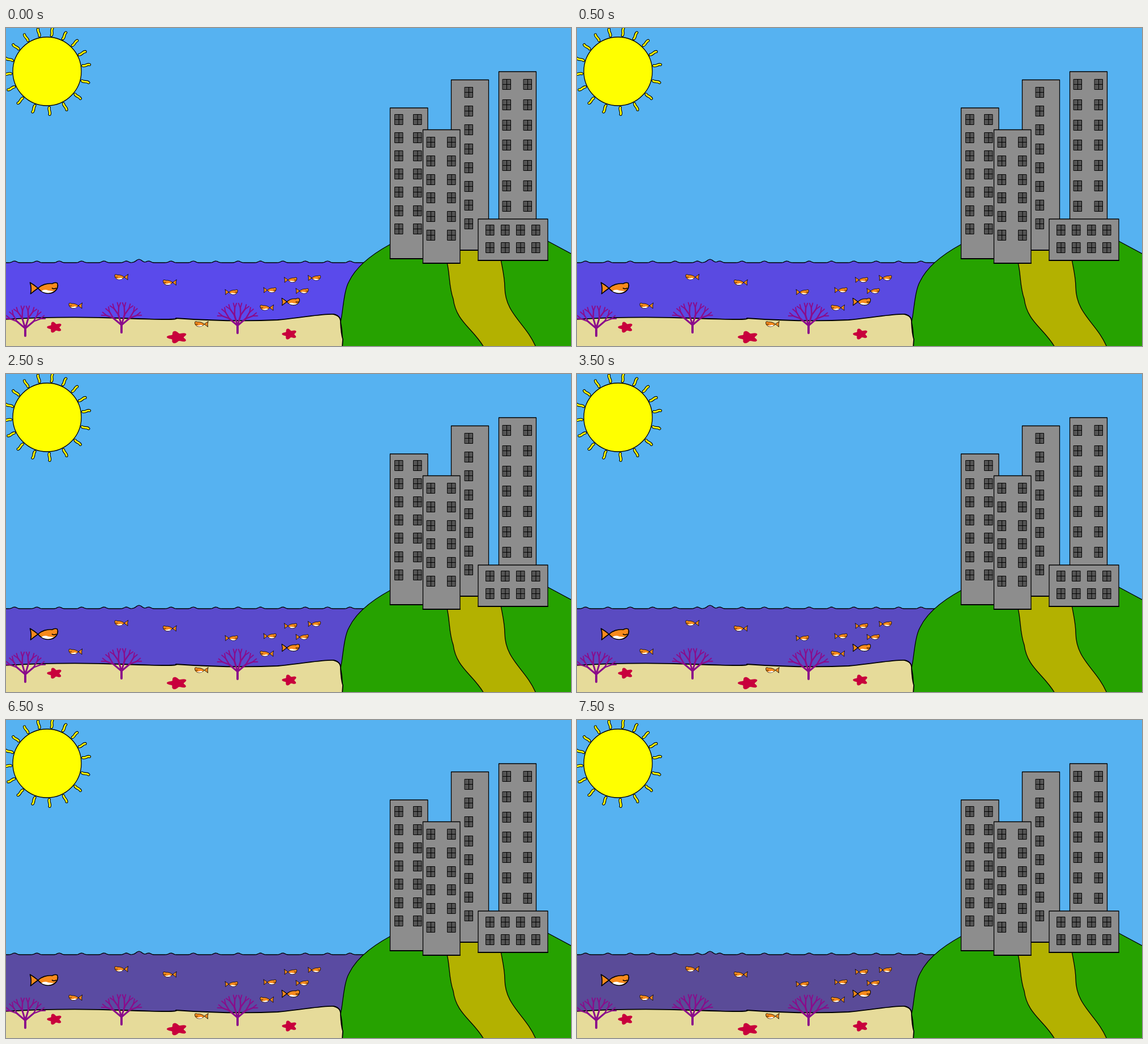
An HTML page that plays this animation: 998 px wide and 561 px high, repeating every 8000 ms.

```html
<!DOCTYPE html>
<html lang="en">
<head>
<meta charset="utf-8">
<title>Sea and city</title>
<style>
  html, body { margin: 0; width: 100%; height: 100%; overflow: hidden; background: #56b2f1; }
  svg { display: block; stroke-linecap: round; stroke-linejoin: round; }
  .rays, #coral { fill: none; }
  #fish path { vector-effect: non-scaling-stroke; }
</style>
</head>
<body>
<svg width="998" height="561" viewBox="0 0 998 561" stroke="#000" stroke-width="1.3">
  <defs>
    <path id="rays"/>
    <g id="coral" stroke="#8b0b8b"></g>
    <path id="star" fill="#c8003c" stroke="none"/>
    <g id="fish">
      <path fill="#f88a1c" d="M-24-10Q-17-6-10 0-17 5-23 10-21 0-24-10Z"/>
      <path fill="#f88a1c" d="M-10 0C-4-6 6-9 15-8Q20-11 24-9C26-5 25 2 19 6 10 12-3 9-10 0Z"/>
      <path fill="#fff" stroke="none" d="M-4 5Q2 1 8 4 14 5 18 5C12 10 2 9-4 5Z"/>
      <path fill="none" d="M15 0Q18 2 22 0"/>
    </g>
    <path id="window" fill="#555" stroke-width="1" d="M-7-9H7V9H-7ZM0-9V9M-7 0H7"/>
  </defs>

  <circle cx="72.5" cy="76.5" r="60.5" fill="#ff0"/>
  <use href="#rays" class="rays" stroke-width="5.2"/>
  <use href="#rays" class="rays" stroke="#ff0" stroke-width="3"/>

  <path id="sea"/>
  <path fill="#26a200" d="M593 563Q596 540 591 518C595 505 596 464 606 447 618 422 645 400 678 382L957 376 1000 399V563Z"/>
  <path fill="#e6db9a" stroke-width="1.8" d="M-2 514Q100 508 205 512T300 512Q400 519 480 515C530 510 560 504 579 505Q592 508 591 520 592 540 595 549L594 563H-2Z"/>
  <path fill="#b3b100" d="M779 414C784 432 782 456 790 478 795 518 825 530 844 563H936C918 520 882 505 881 458 881 440 877 425 874 408L830 385H795Z"/>
  <g id="buildings"></g>
  <g id="seabed"></g>
  <g id="school"></g>
</svg>
<script>
const byId = id => document.getElementById(id);
const range = (n, make) => Array.from({ length: n }, (_, i) => make(i));
const place = (id, x, y, sx = 1, sy = sx, attrs = '') =>
  `<use href="#${id}" transform="translate(${x} ${y}) scale(${sx} ${sy})" ${attrs}/>`;
const polar = (angle, r) => [r * Math.cos(angle), r * Math.sin(angle)];

// Seventeen wavy rays, a little crowded on the left side.
byId('rays').setAttribute('d', range(17, i => {
  const angle = (i * 360 / 17 - 9 + 16 * Math.sin(Math.PI * i / 17)) * Math.PI / 180;
  const points = range(4, k => {
    const [x, y] = polar(angle + [0, .03, -.03, 0][k], 64 + 4 * k);
    return `${72.5 + x} ${76.5 + y}`;
  });
  return `M${points[0]}C${points.slice(1)}`;
}).join(''));

// Small regular crests and one large wave.
const surface = x => 414
  - 3 * Math.max(0, Math.cos((x - 15) * 2 * Math.PI / 39.5)) ** 3
  - 6 * Math.exp(-(((x - 235) / 7) ** 2));
byId('sea').setAttribute('d', `M-2 561L${range(215, i => `${3 * i - 2} ${surface(3 * i - 2)}`)}V561Z`);

function branch(x, y, angle, length, width) {
  const [dx, dy] = polar(angle, length);
  const line = `<path d="M${x} ${y}l${dx} ${dy}" stroke-width="${width}"/>`;
  if (length < 9) return line;
  return line + [-.33, .33].map(turn =>
    branch(x + dx, y + dy, angle + turn, length * .68, width * .8)).join('');
}
byId('coral').innerHTML = '<path d="M0-1V-16" stroke-width="4"/>' +
  range(4, i => branch(0, -14, -Math.PI / 2 + (i - 1.5) * .58, 19, 3)).join('');

byId('star').setAttribute('d', `M${range(40, i => {
  const angle = i * Math.PI / 20;
  return polar(angle, 1 + .25 * Math.cos(5 * angle + 3));
})}Z`);

byId('seabed').innerHTML =
  place('coral', 34, 544) + place('coral', 204, 538) + place('coral', 409, 539) +
  place('star', 86, 528, 11, 8) + place('star', 302.5, 545.5, 15, 9) + place('star', 501, 540, 11, 8);

// Window columns and rows are given as first, step, count.
function building(left, top, right, bottom, [x, dx, columns], [y, dy, rows]) {
  return `<path fill="#8d8d8d" d="M${left} ${top}H${right}V${bottom}H${left}Z"/>` +
    `<path d="M${left} ${bottom}H${right}" stroke-width="2"/>` +
    range(columns, i => range(rows, j =>
      place('window', x + i * dx, Math.round(y + j * dy) + .5)).join('')).join('');
}
byId('buildings').innerHTML =
  building(678.5, 141, 745, 407, [694, 33, 2], [161, 32.1, 7]) +
  building(786.5, 91.5, 852.5, 392, [817.5, 0, 1], [113, 33.2, 8]) +
  building(736.5, 179.5, 802, 415, [750.5, 36.5, 2], [201, 32.8, 6]) +
  building(870.5, 77, 936.5, 345, [884.5, 37, 2], [99, 35.8, 7]) +
  building(834, 337, 957, 410, [855, 27, 4], [356, 30.5, 2]);

const swim = (scale, line, ...spots) => spots.map(([x, y]) =>
  place('fish', x, y, scale, Math.abs(scale), `stroke-width="${line}"`)).join('');
byId('school').innerHTML =
  swim(1, 1.6, [66.5, 459]) +
  swim(.64, 1.1, [502.5, 483]) +
  swim(-.48, .8, [204, 439.5], [289.5, 449], [123, 490], [345.5, 522.5], [461, 493.5]) +
  swim(.45, .8, [398, 466], [466, 462.5], [502.5, 444.5], [544.5, 441], [523, 464]);

// The water turns a shade greyer once a second.
function draw(now) {
  const step = Math.floor((now % 8000 + 500) / 1000);
  byId('sea').setAttribute('fill', `rgb(90, ${Math.round(74 + step / 8)}, ${Math.round(235 - 10.4 * step)})`);
  requestAnimationFrame(draw);
}
draw(performance.now());
</script>
</body>
</html>
```
